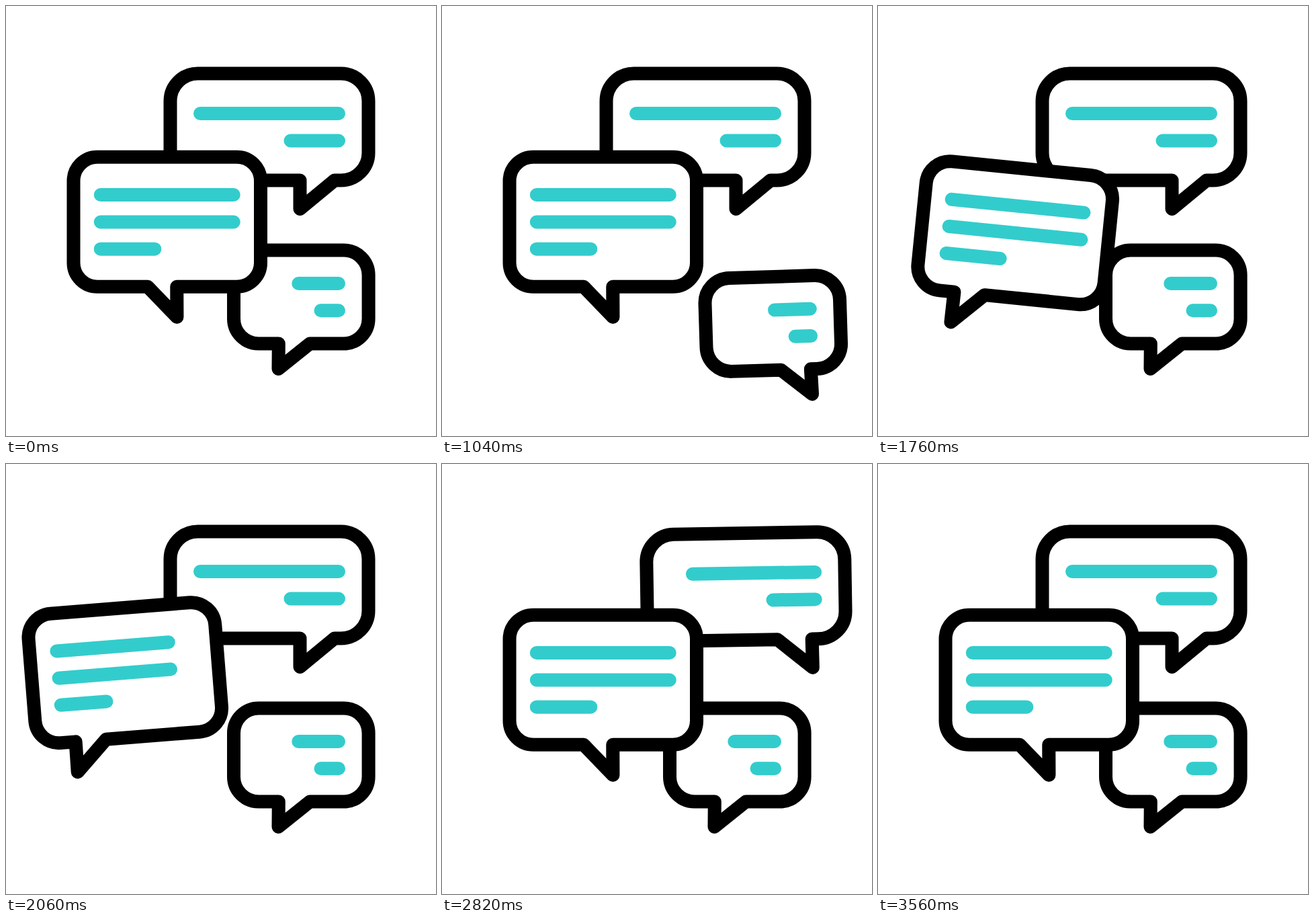
Recreate the animation shown at these times as an HTML page. Size 640x640 px, loop 3.6 s.

```html
<!DOCTYPE html>
<html>
<head>
<meta charset="utf-8">
<style>
  html, body { margin: 0; height: 100%; overflow: hidden; background: #fff; }
  svg { display: block; width: 100vw; height: 100vh; }
  path { stroke-width: 20; stroke-linejoin: round; stroke-linecap: round; }
  .frame { fill: #fff; stroke: #000; }
  .text { fill: none; stroke: #3cc; }
</style>
</head>
<body>
<svg id="stage" viewBox="0 0 640 640"></svg>
<script>
const LOOP = 3600, SWING = 5.8;

// Coordinates are relative to the bubble centre.
// tail: [left root, right root, tip], at rest and when shifted.
// lines: [anchored end, free end, y]. peak: time of the middle swing.
const bubbles = [
  { x: 392, y: 180, w: 147.5, h: 79.5, r: 41, tipY: 122, side: 1, move: [62.5, 0],
    rest: [45.5, 97, 45.5], shifted: [45.5, 97, 97.5], peak: 2705, shrink: 0.2,
    lines: [[103, -103, -20], [103, 31.5, 20.5]] },
  { x: 439.3, y: 433, w: 100.3, h: 69.5, r: 37, tipY: 107, side: 1, move: [57, 36],
    rest: [-33.5, 13, -33.8], shifted: [9.5, 54, 55], peak: 660, shrink: 0.38,
    lines: [[55.7, -4, -20], [55.7, 29.2, 20.3]] },
  { x: 239.75, y: 321.25, w: 139.25, h: 96.5, r: 35.5, tipY: 141.75, side: -1, move: [-50, 0.8],
    rest: [-29, 14.5, 14.7], shifted: [-81.5, -36, -82], peak: 1770, shrink: 0.2,
    lines: [[-99, 99, -40.2], [-99, 99, 0.2], [-99, -18.5, 40.4]] }
];

// Keys: [time relative to the peak, value]
const shiftKeys = [[-550, 0], [-310, 1], [500, 1], [820, 0]];
const swingKeys = [[-360, 0], [-200, -1], [0, 1], [210, -1], [480, 0]];
const shrinkKeys = [[-360, 0], [-200, 1], [0, 0], [210, 1], [480, 0]];

const lerp = (a, b, u) => a + (b - a) * u;

function track(keys, t) {
  if (t <= keys[0][0]) return keys[0][1];
  for (let i = 1; i < keys.length; i++) {
    const [t0, a] = keys[i - 1], [t1, b] = keys[i];
    if (t < t1) {
      const u = (t - t0) / (t1 - t0);
      return lerp(a, b, u * u * (3 - 2 * u));
    }
  }
  return keys[keys.length - 1][1];
}

function add(parent, tag, className) {
  const node = document.createElementNS("http://www.w3.org/2000/svg", tag);
  if (className) node.setAttribute("class", className);
  return parent.appendChild(node);
}

function outline({ w, h, r, tipY }, [left, right, tip]) {
  const arc = (x, y) => `A${r} ${r} 0 0 1 ${x} ${y}`;
  return `M${r - w} ${-h}H${w - r}${arc(w, r - h)}V${h - r}${arc(w - r, h)}` +
    `H${right}L${tip} ${tipY}L${left} ${h}H${r - w}${arc(-w, h - r)}V${r - h}${arc(r - w, -h)}Z`;
}

for (const b of bubbles) {
  b.group = add(stage, "g");
  b.frame = add(b.group, "path", "frame");
  b.text = add(b.group, "path", "text");
}

function draw(now) {
  const time = now % LOOP;
  for (const b of bubbles) {
    const t = time - b.peak;
    const shift = track(shiftKeys, t);
    const angle = SWING * track(swingKeys, t);
    const length = 1 - b.shrink * track(shrinkKeys, t);
    const tail = b.rest.map((v, i) => lerp(v, b.shifted[i], shift));
    const x = b.x + b.move[0] * shift, y = b.y + b.move[1] * shift;
    // Swings about the outer bottom corner.
    b.group.setAttribute("transform",
      `translate(${x} ${y}) rotate(${angle} ${b.side * (b.w + 10)} ${b.tipY + 10})`);
    b.frame.setAttribute("d", outline(b, tail));
    b.text.setAttribute("d", b.lines.map(([from, to, ly]) =>
      `M${from} ${ly}H${lerp(from, to, length)}`).join(""));
  }
}

const start = performance.now();
function tick() {
  draw(performance.now() - start);
  requestAnimationFrame(tick);
}
tick();
</script>
</body>
</html>
```
